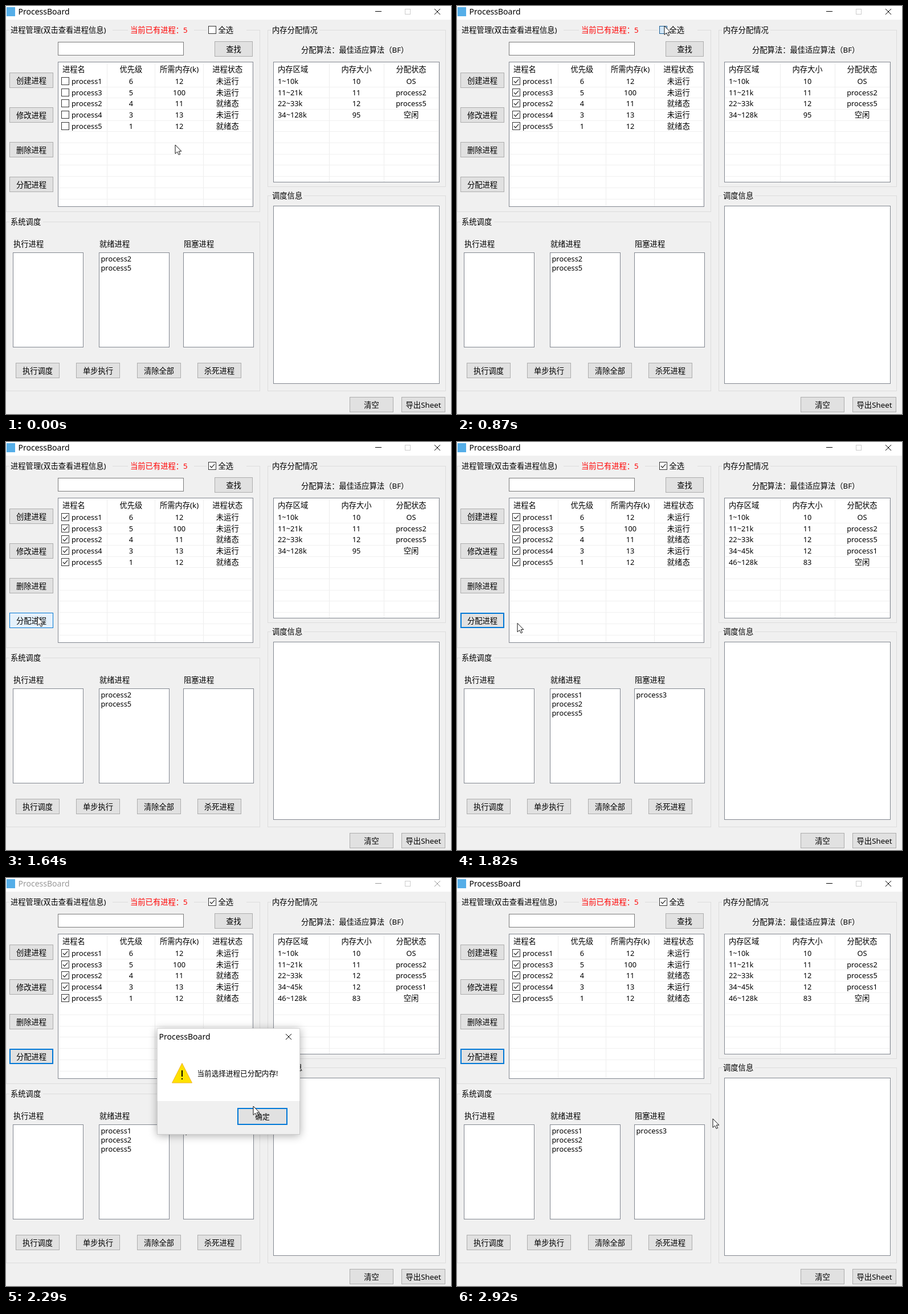
Animation, 781 px wide and 717 px high, one loop 3400 ms. Source, as an HTML page with a canvas:

```html
<!DOCTYPE html>
<html lang="zh-CN">
<head>
<meta charset="utf-8">
<style>
html, body { margin: 0; width: 100%; height: 100%; overflow: hidden; background: #f0f0f0; }
canvas { display: block; }
</style>
</head>
<body>
<canvas id="stage" width="781" height="717"></canvas>
<script>
const c = document.getElementById('stage').getContext('2d');
const FONT = '"Noto Sans", "Noto Sans CJK SC", sans-serif';
const BLUE = '#0078d7', EDGE = '#828790', BACK = '#f0f0f0', APP = 'ProcessBoard';
const ROW = 19.7;

// The screen advances in equal steps; these are the steps where something happens.
const LOOP = 3400, STEP = 79.17, LAST = 37;
const TICK_ALL = 10, ALLOT = 22, CONFIRM = 34;

// Stops of the pointer: step, x, y.
const STOPS = [
  [0, 297, 244], [5, 374, 76], [7, 365, 27], [9, 364, 35], [12, 364, 35], [14, 357, 43],
  [21, 55, 307], [22, 55, 307], [25, 252, 351], [29, 434, 401], [33, 449, 422], [LAST, 449, 423]
];
let tip = [0, 0];

const smooth = k => k * k * (3 - 2 * k);
const clamp = k => Math.min(1, Math.max(0, k));

function pointer(n) {
  const i = Math.max(1, STOPS.findIndex(s => s[0] >= n));
  const [a, x, y] = STOPS[i - 1], [b, u, v] = STOPS[i];
  const k = smooth((n - a) / (b - a));
  return [x + (u - x) * k, y + (v - y) * k];
}

const over = (x, y, w, h) => tip[0] >= x && tip[0] < x + w && tip[1] >= y && tip[1] < y + h;

function rect(x, y, w, h, fill, edge) {
  c.fillStyle = fill;
  c.fillRect(x, y, w, h);
  if (edge) frame(x, y, w, h, edge);
}

function frame(x, y, w, h, edge) {
  c.strokeStyle = edge;
  c.lineWidth = 1;
  c.strokeRect(x + .5, y + .5, w - 1, h - 1);
}

// y is the middle of the line.
function text(s, x, y, { align = 'left', color = '#000', size } = {}) {
  size = size || (/[^\x00-\x7f]/.test(s) ? 13.3 : 12.8);
  c.font = `${size}px ${FONT}`;
  c.textAlign = align;
  c.fillStyle = color;
  c.fillText(s, x, y + 5);
}
const mid = (s, x, y, o) => text(s, x, y, { align: 'center', ...o });

function poly(points, fill, edge, width = 1) {
  c.beginPath();
  points.forEach(([x, y]) => c.lineTo(x, y));
  if (fill) {
    c.closePath();
    c.fillStyle = fill;
    c.fill();
  }
  c.strokeStyle = edge;
  c.lineWidth = width;
  c.stroke();
}

function cross(x, y, color) {
  for (const d of [-5, 5]) poly([[x - 5, y - d], [x + 5, y + d]], null, color);
}

function button(s, x, y, { w = 77, h = 27, state, size } = {}) {
  if (state !== 'press' && over(x, y, w, h)) state = 'hover';
  const fill = { hover: '#e5f1fb', press: '#d6e9f7' }[state] || '#e1e1e1';
  rect(x, y, w, h, fill, state ? BLUE : '#adadad');
  if (state === 'focus') frame(x + 1, y + 1, w - 2, h - 2, BLUE);
  mid(s, x + w / 2, y + h / 2, { size });
}

function checkbox(x, y, on) {
  const hot = over(x, y, 14, 14);
  rect(x, y, 14, 14, hot ? '#d4e8f7' : '#fff', hot ? '#1b5f96' : '#333');
  if (on) poly([[x + 3, y + 7], [x + 5.7, y + 10], [x + 11.3, y + 3.7]], null, '#333', 1.2);
}

function group(x, y, w, h, title, titleWidth) {
  frame(x, y, w, h, '#dcdcdc');
  rect(x + 6, y - 6, titleWidth, 13, BACK);
  text(title, x + 8, y);
}

// The first column is left-aligned, the rest are centred in columns of equal width.
function table(x, w, h, first, colWidth, head, rows, indent = 0) {
  rect(x, 98, w, h, '#fff', EDGE);
  for (let l = first; l < x + w; l += colWidth) rect(Math.floor(l), 100, 1, h - 3, '#ededed');
  for (let y = 141.6; y < 97 + h; y += ROW) rect(x + 2, Math.round(y), w - 4, 1, BACK);
  [head, ...rows].forEach((row, r) => {
    const y = r ? 132 + (r - 1) * ROW : 111;
    row.forEach((s, i) => i
      ? mid(s, first + (i - .5) * colWidth, y)
      : text(s, x + 8 + (r && indent), y));
  });
}

function listBox(title, x, items) {
  text(title, x + 1, 418);
  rect(x, 433, 124, 167, '#fff', EDGE);
  items.forEach((s, i) => text(s, x + 3.5, 444 + i * 16.2));
}

function titleBar(active) {
  const ink = active ? '#000' : '#999';
  rect(0, 0, 781, 24, '#fff');
  rect(1, 2, 15, 16, '#55aee8');
  text(APP, 21.5, 10, { size: 14, color: ink });
  rect(648, 9, 11, 1, ink);
  frame(700, 5, 10, 10, '#ccc');
  cross(757, 10, ink);
}

function processes(n) {
  group(0, 42, 446, 320, '进程管理(双击查看进程信息)', 181);
  rect(214, 36, 116, 13, BACK);
  text('当前已有进程：5', 218, 42, { color: '#f00' });
  rect(352, 36, 70, 13, BACK);
  checkbox(355, 35, n > TICK_ALL + 1);
  text('全选', 372.5, 42);
  rect(91, 63, 221, 24, '#fff', '#7a7a7a');
  button('查找', 366, 62, { w: 67 });

  const pressed = n === ALLOT ? 'press' : n > ALLOT && 'focus';
  ['创建', '修改', '删除', '分配'].forEach((verb, i) =>
    button(verb + '进程', 6, Math.round(116.5 + i * 61), { state: i === 3 && pressed }));

  const names = [1, 3, 2, 4, 5], memory = [12, 100, 11, 13, 12], priority = [6, 5, 4, 3, 1];
  const rows = names.map((id, i) =>
    ['process' + id, priority[i], memory[i], [2, 5].includes(id) ? '就绪态' : '未运行'].map(String));
  table(91, 343, 255, 177, 84.7, ['进程名', '优先级', '所需内存(k)', '进程状态'], rows, 16);
  rows.forEach((_, i) => checkbox(97, Math.round(125 + i * ROW), n > TICK_ALL));
}

function memory(done) {
  group(459, 42, 313, 276, '内存分配情况', 85);
  text('分配算法：最佳适应算法（BF）', 518, 77);
  const blocks = [['OS', 10], ['process2', 11], ['process5', 12]];
  if (done) blocks.push(['process1', 12]);
  const used = blocks.reduce((sum, b) => sum + b[1], 0);
  blocks.push(['空闲', 128 - used]);

  let end = 0;
  const rows = blocks.map(([owner, size]) =>
    [`${end + 1}~${end += size}k`, String(size), owner]);
  table(469, 292, 212, 567, 96, ['内存区域', '内存大小', '分配状态'], rows);
}

function scheduling(done) {
  group(0, 379, 446, 298, '系统调度', 59);
  listBox('执行进程', 12, []);
  listBox('就绪进程', 163, [...(done ? ['process1'] : []), 'process2', 'process5']);
  listBox('阻塞进程', 311, done ? ['process3'] : []);
  ['执行调度', '单步执行', '清除全部', '杀死进程'].forEach((s, i) =>
    button(s, Math.round(17 + i * 106.4), 627));

  group(459, 333, 313, 344, '调度信息', 58);
  rect(469, 351, 292, 313, '#fff', EDGE);
  button('清空', 603, 687);
  button('导出Sheet', 694, 687);
}

// Shadow around a box, leaving its inside untouched.
function shadow(x, y, w, h) {
  c.save();
  c.beginPath();
  c.rect(0, 0, 781, 717);
  c.rect(x, y, w, h);
  c.clip('evenodd');
  c.shadowColor = 'rgba(0,0,0,.32)';
  c.shadowBlur = 14;
  c.shadowOffsetY = 2;
  rect(x, y, w, h, '#fff');
  c.restore();
}

function dialog(n) {
  const opening = clamp((n - ALLOT - 1) / 3), closing = clamp((LAST - n) / 3);
  const alpha = Math.sqrt(opening) * closing ** 2;
  if (!alpha) return;
  const scale = .94 + .06 * alpha;
  c.save();
  c.globalAlpha = alpha;
  c.translate(390, 357);
  c.scale(scale, scale);
  c.translate(-390, -357);

  shadow(265, 264, 251, 187);
  rect(265, 264, 251, 128, '#fff');
  rect(265, 392, 251, 59, BACK);
  frame(265, 264, 251, 187, 'rgba(0,0,0,.15)');
  text(APP, 268.5, 279, { size: 14 });
  cross(496, 279, '#000');
  poly([[309, 325.5], [326.5, 360], [291.5, 360]], '#ffe100', '#f0b429');
  rect(308, 338, 2, 11, '#000');
  rect(308, 352, 2, 2, '#000');
  text('当前选择进程已分配内存!', 335.5, 343, { size: 12.6 });
  button('确定', 406, 404, { w: 88, h: 30, size: 12.8, state: n < CONFIRM ? 'focus' : 'press' });
  c.restore();
}

function cursor(n) {
  const [x, y] = tip;
  if ([TICK_ALL, ALLOT, CONFIRM].includes(n)) {
    c.fillStyle = 'rgba(255,240,0,.6)';
    c.beginPath();
    c.arc(x - 1, y, 13, 0, 7);
    c.fill();
  }
  const arrow = [[0, 0], [0, 15.5], [3.6, 12.2], [6.2, 17.5], [8.6, 16.4], [6.2, 11.2], [10.8, 11.2]];
  poly(arrow.map(([u, v]) => [x + u, y + v]), '#fff', '#111');
}

function draw(now) {
  const n = Math.min(LAST, Math.floor((now % LOOP + 24) / STEP));
  const done = n > ALLOT;
  tip = pointer(n);
  rect(0, 0, 781, 717, BACK);
  titleBar(n < ALLOT + 2 || n > CONFIRM);
  processes(n);
  memory(done);
  scheduling(done);
  dialog(n);
  cursor(n);
}

const start = performance.now();
function tick() {
  draw(performance.now() - start);
  requestAnimationFrame(tick);
}
tick();
</script>
</body>
</html>
```
